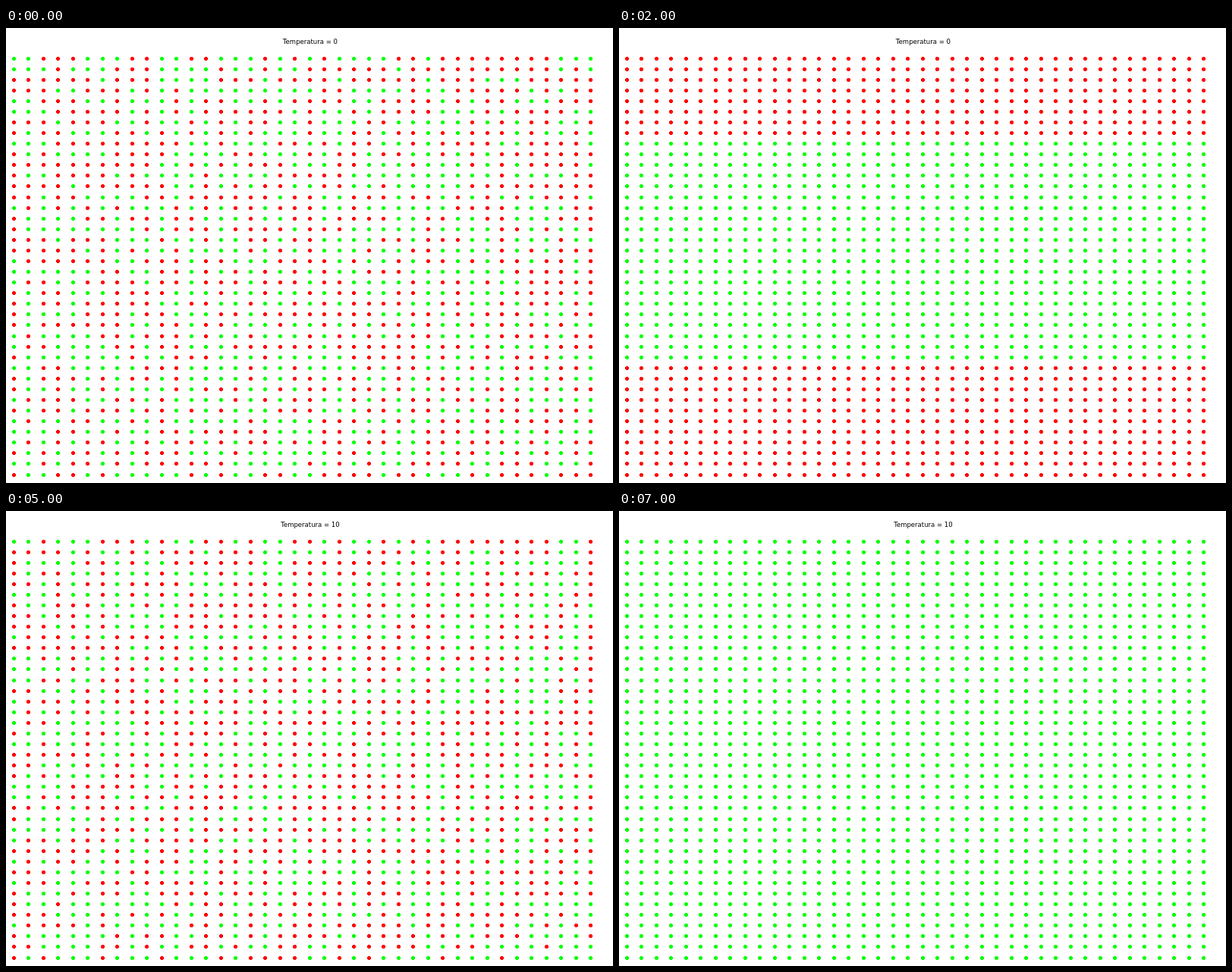
Recreate the animation shown at these times as an HTML page with a canvas. Size 800 by 600 pixels, loop 8000 ms.

```html
<!DOCTYPE html>
<html>
<head>
<meta charset="utf-8">
<style>
  html, body { margin: 0; height: 100%; overflow: hidden; background: #fff; }
  canvas { display: block; }
</style>
</head>
<body>
<canvas id="stage" width="800" height="600"></canvas>
<script>
const ctx = document.getElementById('stage').getContext('2d');
const SIZE = 40, LOOP = 8000;
const RED = '#f00', GREEN = '#0f0';

function randomSpins(seed) {
  const spins = Array.from({ length: SIZE * SIZE }, () => {
    seed = (seed + 0x6D2B79F5) | 0;
    let t = Math.imul(seed ^ (seed >>> 15), 1 | seed);
    t ^= t + Math.imul(t ^ (t >>> 7), 61 | t);
    return ((t ^ (t >>> 14)) >>> 0) < 2 ** 31;
  });
  return (col, row) => spins[row * SIZE + col];
}

// Each state tells whether the spin at (col, row) is up (green).
const states = [
  { start: 0, temperature: 0, isUp: randomSpins(7) },
  { start: 1000, temperature: 0, isUp: (col, row) => row >= 8 && row <= 28 },
  { start: 5000, temperature: 10, isUp: randomSpins(23) },
  { start: 6000, temperature: 10, isUp: () => true }
];

// A crisp 5-pixel dot with its corners cut off.
function drawDot(x, y, color) {
  ctx.fillStyle = color;
  ctx.fillRect(x - 2, y - 1, 5, 3);
  ctx.fillRect(x - 1, y - 2, 3, 5);
}

function draw({ temperature, isUp }) {
  ctx.fillStyle = '#fff';
  ctx.fillRect(0, 0, 800, 600);

  ctx.fillStyle = '#000';
  ctx.font = '8.53px "DejaVu Sans", sans-serif';
  ctx.textAlign = 'center';
  ctx.fillText('Temperatura = ' + temperature, 400.9, 21);

  for (let row = 0; row < SIZE; row++) {
    const y = Math.floor(40.01 + row * 549 / 39);
    for (let col = 0; col < SIZE; col++) {
      const x = Math.floor(10.5 + col * 760 / 39);
      drawDot(x, y, isUp(col, row) ? GREEN : RED);
    }
  }
}

let shown;
function tick() {
  const time = performance.now() % LOOP;
  const state = states.findLast(s => time >= s.start);
  if (state !== shown) draw(shown = state);
  requestAnimationFrame(tick);
}
tick();
</script>
</body>
</html>
```
